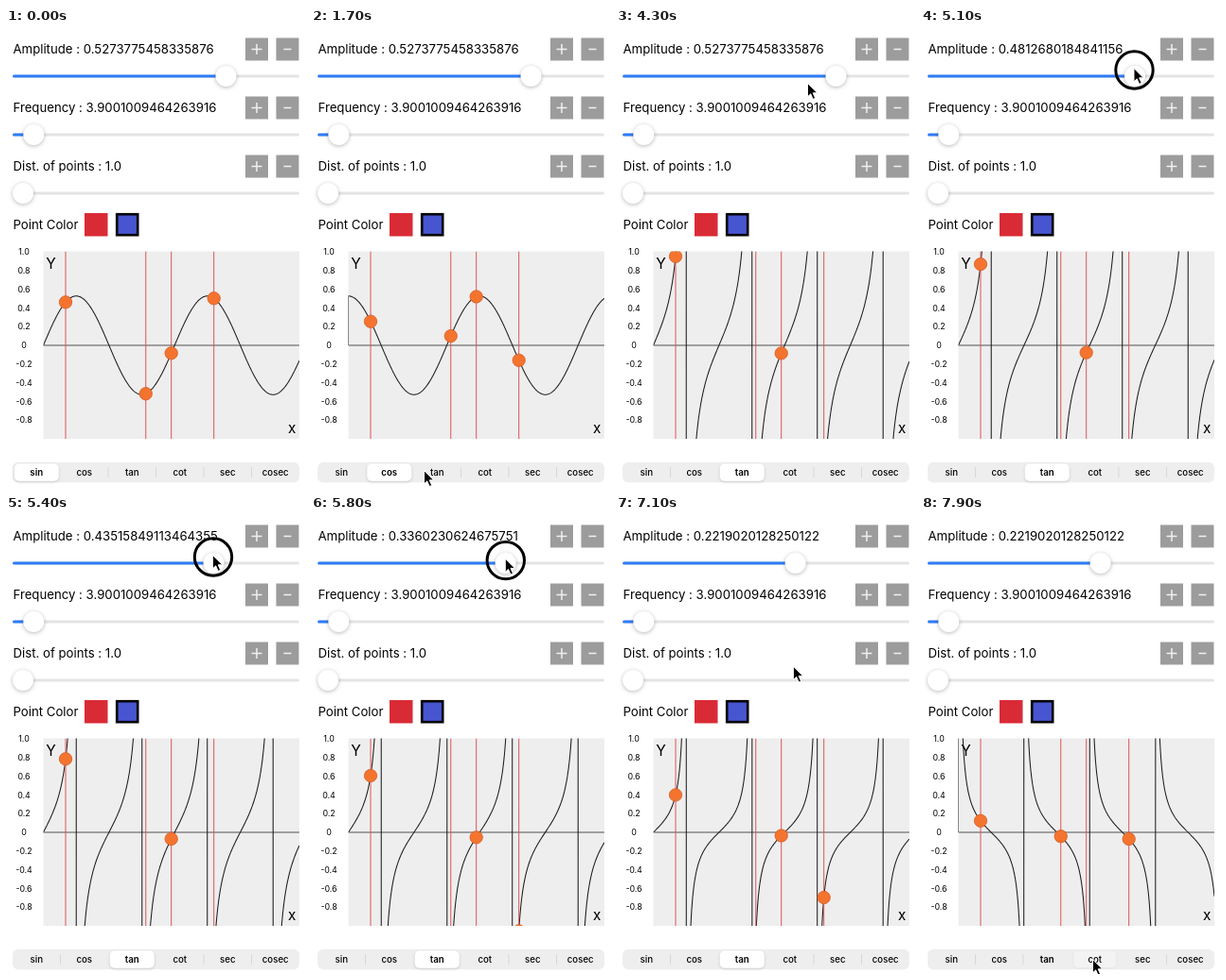
Write an HTML page that moves like this. It is 316 px wide and 486 px high and loops after 8000 ms.

```html
<!DOCTYPE html>
<html lang="en">
<head>
<meta charset="utf-8">
<title>Trigonometric functions</title>
<style>
  html, body { margin: 0; width: 100%; height: 100%; overflow: hidden; background: #fff; }
  svg { display: block; width: 316px; height: 486px; font-family: Inter, Roboto, sans-serif; }
  .title { font-size: 13.2px; }
  .tick { font-size: 8.8px; text-anchor: middle; }
  .axis { font-size: 15.5px; text-anchor: middle; }
  .tab { font-size: 9.7px; font-weight: 500; text-anchor: middle; }
  .tab.on { font-weight: 600; }
  .thumb { fill: #fff; filter: drop-shadow(0 1.5px 2px rgba(0, 0, 0, .28)); }
  .pill { fill: #fff; filter: drop-shadow(0 1px 1.5px rgba(0, 0, 0, .16)); }
</style>
</head>
<body>
<svg id="stage" viewBox="0 0 316 486" xmlns="http://www.w3.org/2000/svg"></svg>
<script>
const LOOP = 8000, STEP = 100;
const BOX = { x: 39.5, y: 236.5, w: 270.5, h: 198.5 };
const ZERO = 336, UNIT = 99, FREQ = 3.9001009464263916;
const POINTS = [63, 147.75, 174.7, 219.7];
const TABS = ['sin', 'cos', 'tan', 'cot', 'sec', 'cosec'];
const TAB_W = 50.5, LEFT = 7, RIGHT = 310;
const FN = [Math.sin, Math.cos, Math.tan, a => 1 / Math.tan(a)];

// time, selected tab
const PICKS = [[-1000, 0], [900, 1], [2600, 2], [7900, 3]];
// time, amplitude
const AMPS = [
  [0, 0.5273775458335876], [4800, 0.5273775458335876],
  [5400, 0.43515849113464355], [6400, 0.18731988966464996],
  [6700, 0.2219020128250122], [LOOP, 0.2219020128250122]
];
// time, pointer x, pointer y
const MOVES = [
  [100, 98, 483], [500, 83, 469], [1500, 83, 469], [1700, 119, 468],
  [2200, 133, 468], [3300, 133, 468], [4200, 200, 63], [4300, 202, 58],
  [4600, 231, 42], [4800, 231, 42], [5400, 218, 42], [6400, 185, 51],
  [6700, 189, 51], [6800, 189, 51], [7700, 181, 470], [LOOP, 181, 470]
];
const PRESS = [4800, 6900];

const stage = document.getElementById('stage');

function add(name, attrs, parent = stage, text) {
  const el = document.createElementNS('http://www.w3.org/2000/svg', name);
  set(el, attrs);
  if (text !== undefined) el.textContent = text;
  parent.append(el);
  return el;
}
function set(el, attrs) {
  for (const k in attrs) el.setAttribute(k, attrs[k]);
}
const label = (cls, x, y, text, parent) => add('text', { class: cls, x, y }, parent, text);
const rect = (x, y, width, height, fill, more) => add('rect', { x, y, width, height, fill, ...more });

function slider(title, y, thumbX) {
  const text = label('title', LEFT + .5, y + 5, title);
  for (const [cx, r, d] of [[265, 5.5, 'V'], [297.5, 4, '']]) {
    rect(cx - 12, y - 11.5, 24, 24, '#9c9c9c');
    let path = `M${cx - r} ${y + .5}h${2 * r}`;
    if (d) path += `M${cx} ${y + .5 - r}v${2 * r}`;
    add('path', { d: path, stroke: '#f0f0f0', 'stroke-width': 1.5 });
  }
  rect(LEFT, y + 27.5, RIGHT - LEFT, 3, '#e4e4e6', { rx: 1.5 });
  const fill = rect(LEFT, y + 27.5, thumbX - LEFT, 3, '#2f7cf6', { rx: 1.5 });
  const thumb = add('circle', { class: 'thumb', cx: thumbX, cy: y + 29, r: 11 });
  return { text, fill, thumb };
}

const amp = slider('', 22, 232);
slider('Frequency : ' + FREQ, 84, 29.3);
slider('Dist. of points : 1.0', 146, 18);

label('title', LEFT + .5, 213, 'Point Color');
rect(83, 196, 24.5, 24.5, '#d92b36');
rect(117.2, 197.2, 22, 22, '#4755d0', { stroke: '#000', 'stroke-width': 2.6 });

// Chart
for (let i = 5; i > -5; i--) {
  label('tick', 19, ZERO + 3.2 - i * UNIT / 5, i ? (i / 5).toFixed(1) : '0');
}
const clip = add('clipPath', { id: 'box' });
const area = { x: BOX.x, y: BOX.y, width: BOX.w, height: BOX.h };
add('rect', area, clip);
add('rect', { ...area, fill: '#eee' });
const chart = add('g', { 'clip-path': 'url(#box)' });
add('path', { d: `M${BOX.x} ${ZERO}h${BOX.w}`, stroke: '#858585', 'stroke-width': 1.6 }, chart);
const curve = add('path', { fill: 'none', stroke: '#1c1c1c', 'stroke-width': 1.05 }, chart);
for (const x of POINTS) {
  add('path', { d: `M${x} ${BOX.y}v${BOX.h}`, stroke: '#dc5555', 'stroke-width': 1 }, chart);
}
const dots = POINTS.map(cx =>
  add('circle', { cx, r: 6.7, fill: '#f4742f', stroke: '#d65c25', 'stroke-width': .8 }, chart));
label('axis', 47.5, 255, 'Y');
label('axis', 302.3, 428.5, 'x');

// Segmented control
const tabX = i => LEFT + TAB_W * (i + .5);
rect(LEFT, 459.7, RIGHT - LEFT, 21.6, '#eeeeef', { rx: 6 });
const bars = TABS.slice(1).map((_, i) => rect(LEFT + TAB_W * (i + 1) - .4, 465, .8, 11, '#d2d2d4'));
const pill = add('rect', { class: 'pill', x: -23.5, y: -9.3, width: 47, height: 18.6, rx: 5 });
const tabs = TABS.map((name, i) => label('tab', tabX(i), 474, name));

// Pointer
const ring = add('circle', { r: 19.7, fill: 'none', stroke: '#000', 'stroke-width': 3 });
const arrow = add('path', {
  d: 'M.5 .5V14.8L3.7 11.8L6.2 17.4L8.7 16.3L6.2 10.8H10.7Z',
  fill: '#000', stroke: '#fff', 'stroke-width': 1, 'stroke-linejoin': 'round'
});

function sample(table, t, ease = u => u) {
  let i = 0;
  while (i < table.length - 2 && table[i + 1][0] <= t) i++;
  const [a, b] = [table[i], table[i + 1]];
  const u = ease(Math.min(1, Math.max(0, (t - a[0]) / (b[0] - a[0]))));
  return a.slice(1).map((v, k) => u === 1 ? b[k + 1] : v + (b[k + 1] - v) * u);
}
const smooth = u => u * u * (3 - 2 * u);

function height(fn, a, x) {
  const v = a * fn(Math.PI * FREQ * (x - BOX.x) / BOX.w);
  return ZERO - UNIT * Math.max(-20, Math.min(20, v));
}

function drawChart(fn, a) {
  let d = `M${BOX.x} ${ZERO}`;
  for (let x = BOX.x; x <= BOX.x + BOX.w; x += .5) d += `L${x} ${height(fn, a, x).toFixed(2)}`;
  set(curve, { d });
  dots.forEach((dot, i) => set(dot, { cy: height(fn, a, POINTS[i]) }));
}

function drawTabs(t, n) {
  const [start, cur] = PICKS[n];
  const age = (t - start) / STEP;
  const u = [.3, .75][age] ?? 1;
  const bold = age < 1 ? PICKS[n - 1][1] : cur;
  set(pill, {
    transform: `translate(${tabX(cur)} 470.5) scale(${.93 + .07 * u})`,
    opacity: u
  });
  bars.forEach((bar, i) => set(bar, { opacity: i === cur || i + 1 === cur ? 0 : 1 }));
  tabs.forEach((tab, i) => tab.classList.toggle('on', i === bold));
}

function draw(t) {
  const a = Math.fround(sample(AMPS, t)[0]);
  const n = PICKS.findLastIndex(p => p[0] <= t);
  amp.text.textContent = 'Amplitude : ' + a;
  const x = 158.5 + 140.3 * a;
  set(amp.thumb, { cx: x });
  set(amp.fill, { width: x - LEFT });
  drawChart(FN[PICKS[n][1]], a);
  drawTabs(t, n);

  const down = t >= PRESS[0] && t < PRESS[1];
  const [px, py] = sample(MOVES, t, down ? undefined : smooth);
  set(arrow, { transform: `translate(${px} ${py})`, opacity: t < MOVES[0][0] ? 0 : 1 });
  set(ring, { cx: px + 1, cy: py + 2.5, opacity: down ? 1 : 0 });
}

const origin = performance.now();
let last = -1;
function tick() {
  const elapsed = Math.max(0, performance.now() - origin) % LOOP;
  const t = Math.floor(elapsed / STEP) * STEP;
  if (t !== last) draw(last = t);
  requestAnimationFrame(tick);
}
draw(0);
tick();
</script>
</body>
</html>
```
